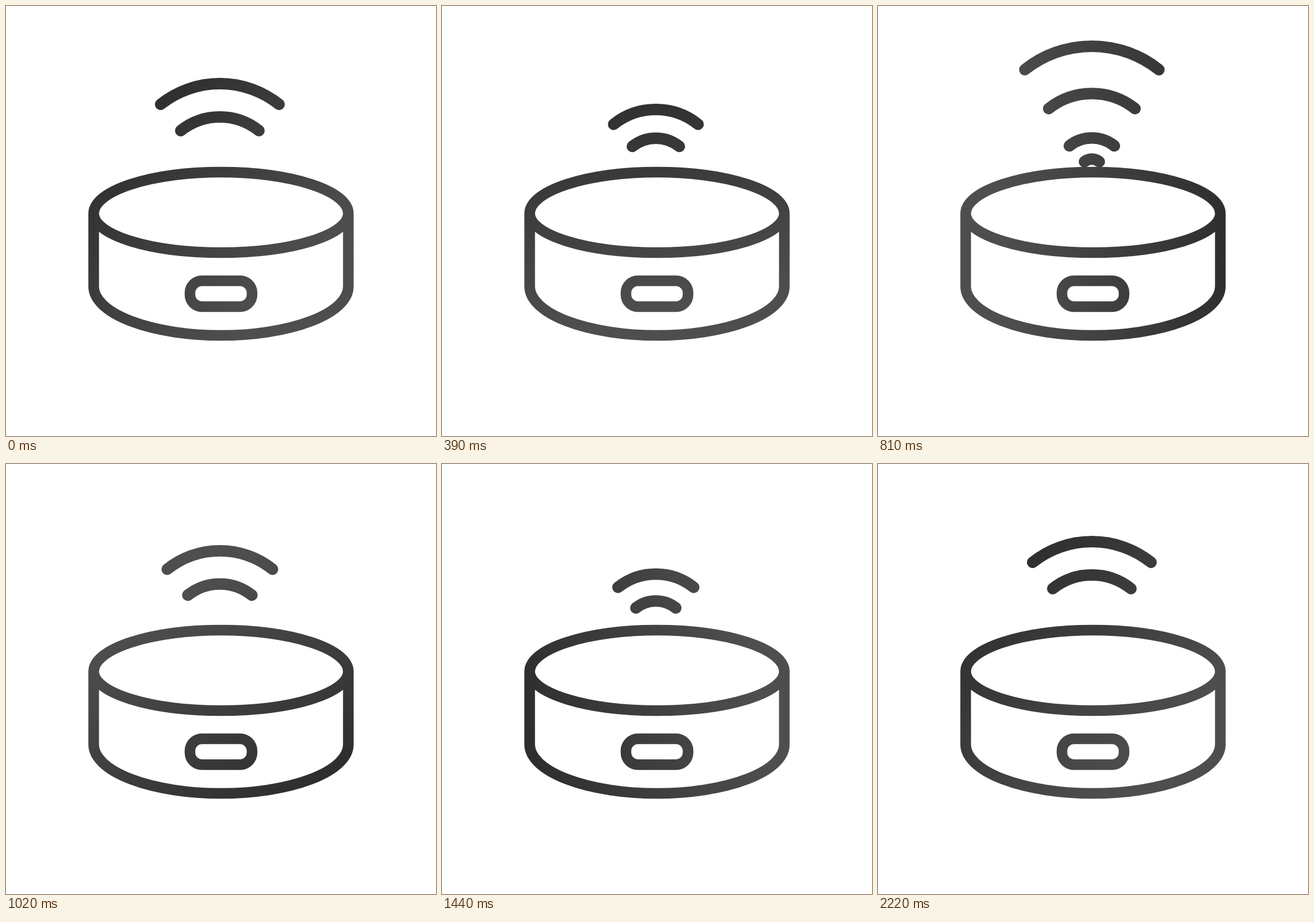
An HTML page with a canvas that plays this animation: 748x748 px, repeating every 4250 ms.

```html
<!DOCTYPE html>
<html lang="en">
<head>
<meta charset="utf-8">
<style>
html, body { margin: 0; width: 100%; height: 100%; overflow: hidden; background: #fff; }
canvas { display: block; width: 748px; height: 748px; }
</style>
</head>
<body>
<canvas id="c" width="748" height="748"></canvas>
<script>
const ctx = document.getElementById('c').getContext('2d');
const LOOP = 4250, STEP = 30, LAST = 74, PERIOD = 18, FINAL = 2;
// Ages of a wave, in steps
const SWING = 16, THROW = 23, GONE = 28;

// Half width and top of a wave: at rest, when fully risen, and the size of the last swing
const waves = [
  { birth: 5.5, rest: { half: 103, y: 135 }, top: { half: 109, y: 116 }, swing: { half: 16, y: -19.5 }, kick: 72 },
  { birth: 7.5, rest: { half: 68, y: 193 }, top: { half: 70, y: 183 }, swing: { half: 26, y: -24 }, kick: 48 }
];

const mix = (a, b, u) => a + (b - a) * u;
const easeOut = (u, power) => 1 - (1 - u) ** power;

function place({ birth, rest, top, swing, kick }, pulse, age) {
  if (pulse === FINAL && age >= SWING) {
    const s = Math.sin(Math.PI * Math.min((age - 19) / 13, 1));
    return [rest.half + swing.half * s, rest.y + swing.y * s];
  }
  if (age > THROW) {
    const u = ((age - THROW) / (GONE - THROW)) ** 2;
    return [top.half + kick * u / 6, top.y - kick * u];
  }
  // The waves seen at the start leave from rest, all others from the body
  if (pulse < 0) {
    const u = (age - PERIOD) / (THROW - PERIOD);
    return [mix(rest.half, top.half, u), mix(rest.y, top.y, u)];
  }
  const u = (age - birth) / (THROW - birth);
  return [top.half * easeOut(u, 2), mix(282, top.y, easeOut(u, 1.7))];
}

function drawWave(wave, pulse, age) {
  if (age < wave.birth || (age > GONE && pulse !== FINAL)) return;
  const [half, y] = place(wave, pulse, age), r = half * 1.604;
  ctx.beginPath();
  ctx.arc(372, y + r, r, -Math.PI / 2 - 0.673, -Math.PI / 2 + 0.673);
  ctx.stroke();
}

function drawBody(squash) {
  const rx = 221.5 + 6 * squash, y = 361 + 13 * squash;
  ctx.beginPath();
  ctx.ellipse(374, y, rx, 68, 0, 0, Math.PI);
  ctx.ellipse(374, y, rx, 72, 0, Math.PI, 2 * Math.PI);
  ctx.lineTo(374 + rx, 488);
  ctx.ellipse(374, 488, rx, 85, 0, 0, Math.PI);
  ctx.lineTo(374 - rx, y);
  ctx.stroke();

  const half = 54 + 7 * squash;
  ctx.beginPath();
  ctx.roundRect(374 - half, 478 + 7 * squash, 2 * half, 45, 21);
  ctx.stroke();
}

// The dark side turns once, clockwise from the upper left
function shade(step) {
  const u = Math.min(step / 65, 1);
  const angle = Math.PI * (1.25 + 1 - Math.cos(Math.PI * u));
  const at = d => [374 + d * Math.cos(angle), 374 + d * Math.sin(angle)];
  const g = ctx.createLinearGradient(...at(240), ...at(-160));
  g.addColorStop(0, '#2e2e2e');
  g.addColorStop(1, '#4e4e4e');
  return g;
}

function draw(step) {
  ctx.fillStyle = '#fff';
  ctx.fillRect(0, 0, 748, 748);
  ctx.strokeStyle = shade(step);

  const phase = step - PERIOD * Math.min(Math.floor(step / PERIOD), FINAL);
  ctx.lineWidth = 18.5;
  ctx.lineCap = 'butt';
  drawBody(Math.sin(Math.PI * Math.min(phase / 6, 1)) ** 2);

  ctx.lineWidth = 20;
  ctx.lineCap = 'round';
  for (let pulse = -1; pulse <= FINAL; pulse++) {
    for (const wave of waves) drawWave(wave, pulse, step - pulse * PERIOD);
  }
}

const start = performance.now();
function tick() {
  const t = (performance.now() - start) % LOOP;
  draw(Math.min(Math.floor(t / STEP), LAST));
  requestAnimationFrame(tick);
}
tick();
</script>
</body>
</html>
```
